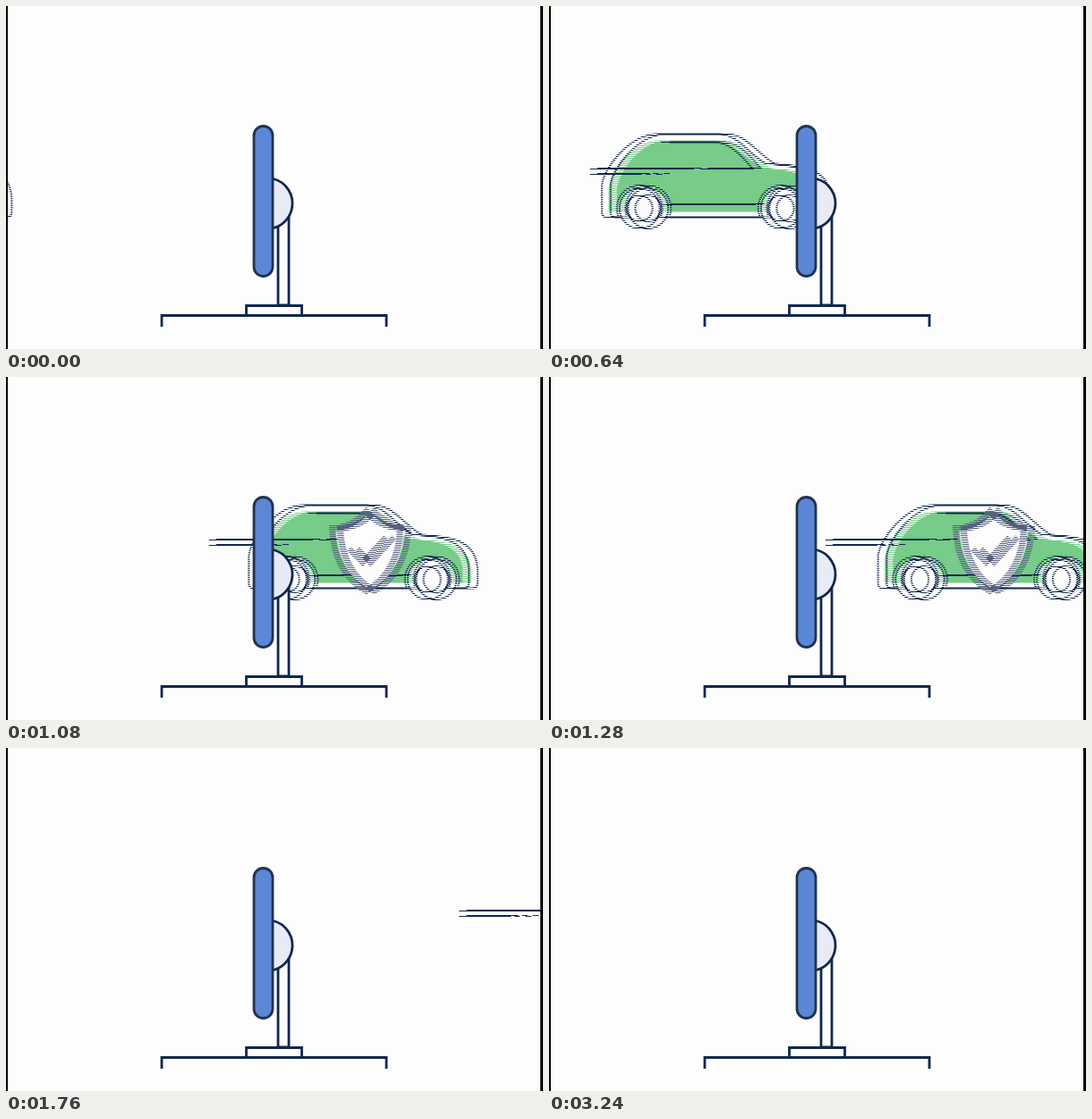
An HTML page with a canvas for the animation above (3.28 s loop, 600 by 384 pixels).

```html
<!DOCTYPE html>
<html lang="en">
<head>
<meta charset="utf-8">
<title>Car scanner</title>
<style>
  html, body { margin: 0; height: 100%; overflow: hidden; background: #fefdfe; }
  canvas { display: block; }
</style>
</head>
<body>
<canvas id="stage" width="600" height="384"></canvas>
<script>
const ctx = document.getElementById('stage').getContext('2d');
const W = 600, H = 384, LOOP = 3280, STEP = 40;
const PAPER = '#fefdfe', NAVY = '#10274c', GREEN = '#76cc88', SLATE = '#56617f';

// Car paths: x is measured from the rear wheel hub, y from the stage top.
const body = new Path2D('M-42 231V200C-40 180-12 146 16 143H90C110 144 120 163 141 176C172 178 202 181 204 214V230Q204 236 198 236H-36Q-42 236-42 231Z');
const panel = new Path2D('M-35 230V205C-32 182-8 153 18 150H88C104 152 116 168 138 181C170 183 194 188 197 214V230Z');
const trim = new Path2D('M24 152H86C102 154 113 166 126 181.5H70M24 221.5H130');
const shield = new Path2D('M0 150C-10 162-24 168-38 169C-37 200-24 226 0 239C24 226 37 200 38 169C24 168 10 162 0 150Z');
const tick = new Path2D('M-19 192L-4 207L22 179');
const upperDashes = [[0, 116], [123, 139], [146, 153]];
const lowerDashes = [[0, 58], [62, 68], [74, 81]];

// Interlaced fields: alternate rows, half a frame apart.
const fields = [0, 1].map(parity => {
  const rows = new Path2D();
  for (let y = parity; y < H; y += 2) rows.rect(0, y, W, 1);
  return { rows, shift: parity ? 10 : -10 };
});

function paint(path, fill, stroke = NAVY, width = 2.2) {
  if (fill) {
    ctx.fillStyle = fill;
    ctx.fill(path);
  }
  if (stroke) {
    ctx.strokeStyle = stroke;
    ctx.lineWidth = width;
    ctx.stroke(path);
  }
}

function circle(x, y, r, start = 0, end = 2 * Math.PI) {
  const path = new Path2D();
  path.arc(x, y, r, start, end);
  return path;
}

function at(x, draw) {
  ctx.save();
  ctx.translate(x, 0.5);
  draw();
  ctx.restore();
}

function drawCar() {
  paint(body, PAPER);
  paint(panel, GREEN, null);
  paint(trim);
  for (const x of [0, 158]) {
    paint(circle(x, 226, 25.5, Math.PI - 0.35, 0.35), PAPER);
    paint(circle(x, 226, 22.5), PAPER);
    paint(circle(x, 226, 14.5));
  }
}

function drawDashes() {
  ctx.fillStyle = NAVY;
  for (const [a, b] of upperDashes) ctx.fillRect(a, 180.5, b - a, 2);
  for (const [a, b] of lowerDashes) ctx.fillRect(a, 186.5, b - a, 2);
}

function drawShield() {
  paint(shield, PAPER, SLATE, 7);
  paint(tick, null, SLATE, 6.5);
}

function drawMoving(t) {
  at(106 + (t - 640) * 0.482, drawCar);
  at(50 + (t - 640) * 0.411, drawDashes);
  ctx.save();
  ctx.beginPath();
  ctx.rect(287, 0, W, H); // the badge only shows once scanned
  ctx.clip();
  at(407 + (t - 1080) * 0.45, drawShield);
  ctx.restore();
}

function drawScanner() {
  paint(new Path2D('M304 240V335H316V230'), PAPER, NAVY, 2.8);
  paint(circle(291.5, 221, 28.5, -1.34, 1.34), '#e8ebf5', NAVY, 2.8);
  const pill = new Path2D();
  pill.roundRect(277, 134.5, 21, 168, 10.5);
  paint(pill, '#5c86d6', '#20334f', 2.8);
  paint(new Path2D('M268.5 346V335.5H330.5V346M174 359V346.5H425V359'), null, NAVY, 2.8);
}

function frame(now) {
  const t = Math.floor((now % LOOP) / STEP) * STEP;
  ctx.fillStyle = PAPER;
  ctx.fillRect(0, 0, W, H);
  for (const { rows, shift } of fields) {
    ctx.save();
    ctx.clip(rows);
    drawMoving(t + shift);
    ctx.restore();
  }
  drawScanner();
  ctx.fillStyle = '#000';
  ctx.fillRect(0, 0, 2, H);
  ctx.fillRect(597, 0, 3, H);
  requestAnimationFrame(frame);
}
frame(0);
</script>
</body>
</html>
```
